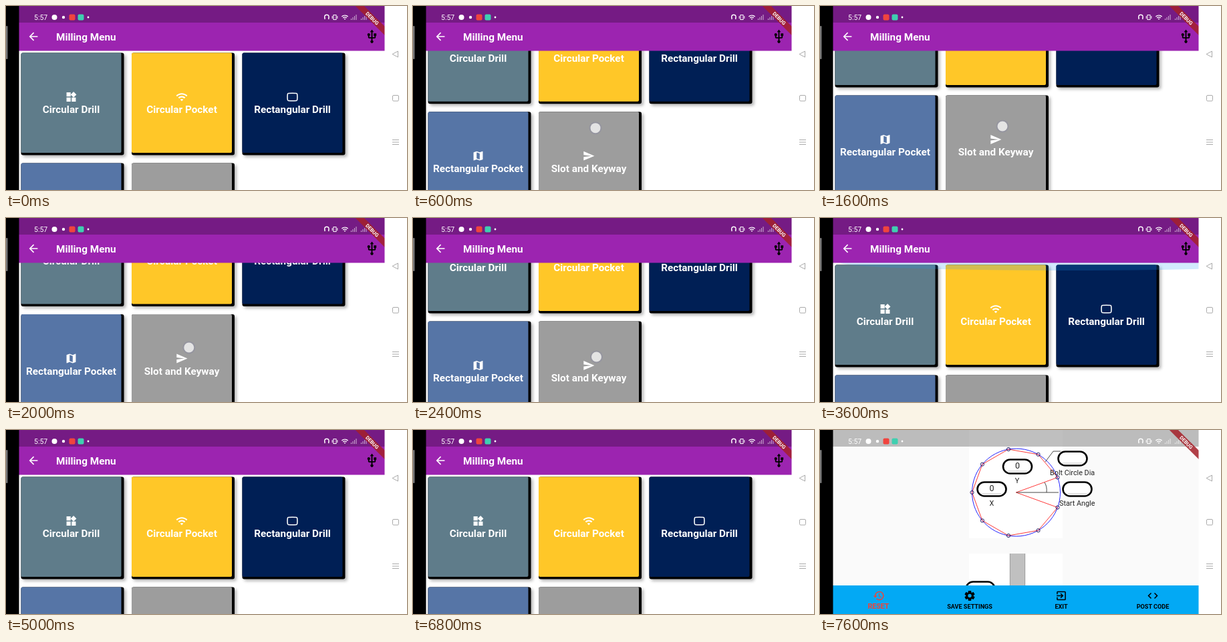
An HTML page that plays this animation: 600x277 px, repeating every 8 s.

```html
<!DOCTYPE html>
<html lang="en">
<head>
<meta charset="utf-8">
<title>Milling Menu</title>
<style>
html, body { margin: 0; width: 100%; height: 100%; overflow: hidden; background: #fff; }
svg { display: block; width: 100vw; height: 100vh; font-family: Roboto, "Open Sans", sans-serif; }
.mid { text-anchor: middle; }
.bold { font-weight: 700; }
.card { filter: drop-shadow(3px 3px 2px rgba(0, 0, 0, .28)); }
</style>
</head>
<body>
<svg id="stage" viewBox="0 0 600 277" preserveAspectRatio="none"></svg>
<script>
const LOOP = 8000, STEP = 200;

const PATHS = {
  back: 'M20 11H7.83l5.59-5.59L12 4l-8 8 8 8 1.41-1.41L7.83 13H20v-2z',
  usb: 'M15 7v4h1v2h-3V5h2l-3-4-3 4h2v8H8v-2.07c.7-.37 1.2-1.08 1.2-1.93a2.2 2.2 0 1 0-4.4 0c0 .85.5 1.56 1.2 1.93V13c0 1.11.89 2 2 2h3v3.05a2.2 2.2 0 1 0 2 0V15h3c1.11 0 2-.89 2-2v-2h1V7z',
  widgets: 'M13 13v8h8v-8zM3 21h8v-8H3zM3 3v8h8V3zm13.66-1.31L11 7.34 16.66 13l5.66-5.66z',
  wifi: 'M1 9l2 2c4.97-4.97 13.03-4.97 18 0l2-2C16.93 2.93 7.08 2.93 1 9zm8 8l3 3 3-3c-1.65-1.66-4.34-1.66-6 0zm-4-4l2 2c2.76-2.76 7.24-2.76 10 0l2-2C15.14 9.14 8.87 9.14 5 13z',
  screen: 'M4 5Q12 4 20 5Q21 5 21.4 7Q22 12 21.4 17Q21 19 20 19Q12 20 4 19Q3 19 2.6 17Q2 12 2.6 7Q3 5 4 5Z',
  map: 'M20.5 3l-.16.03L15 5.1 9 3 3.36 4.9c-.21.07-.36.25-.36.48V20.5c0 .28.22.5.5.5l.16-.03L9 18.9l6 2.1 5.64-1.9c.21-.07.36-.25.36-.48V3.5c0-.28-.22-.5-.5-.5zM15 19l-6-2.11V5l6 2.11z',
  send: 'M2.01 21L23 12 2.01 3 2 10l15 2-15 2z',
  history: 'M13 3a9 9 0 0 0-9 9H1l3.96 4.03L9 12H6a7 7 0 1 1 2.06 4.94l-1.42 1.42A9 9 0 1 0 13 3zm-1 5v5l4.28 2.54.72-1.21-3.5-2.08V8z',
  exit: 'M10.09 15.59L11.5 17l5-5-5-5-1.41 1.41L12.67 11H3v2h9.67zM19 3H5a2 2 0 0 0-2 2v4h2V5h14v14H5v-4H3v4a2 2 0 0 0 2 2h14a2 2 0 0 0 2-2V5a2 2 0 0 0-2-2z',
  code: 'M9.4 16.6L4.8 12l4.6-4.6L8 6l-6 6 6 6zm5.2 0l4.6-4.6-4.6-4.6L16 6l6 6-6 6z'
};

const rect = (x, y, w, h, fill, more = '') =>
  `<rect x="${x}" y="${y}" width="${w}" height="${h}" fill="${fill}" ${more}/>`;
const circle = (x, y, r, fill, more = '') =>
  `<circle cx="${x}" cy="${y}" r="${r}" fill="${fill}" ${more}/>`;
const line = (d, color, width = 1) =>
  `<path d="${d}" fill="none" stroke="${color}" stroke-width="${width}"/>`;
const text = (s, x, y, size, fill, cls = '') =>
  `<text x="${x}" y="${y}" font-size="${size}" fill="${fill}" class="${cls}">${s}</text>`;
// Icons sit on a 24-unit grid and are placed by their centre.
const icon = (name, x, y, scale, fill, more = '') =>
  `<path d="${PATHS[name]}" transform="translate(${x} ${y}) scale(${scale}) translate(-12 -12)" fill="${fill}" ${more}/>`;

function card(label, glyph, color, col, row) {
  const x = 22.5 + col * 165.5, y = 70.5 + row * 166;
  const cx = x + 75;
  const outline = glyph === 'screen';
  return `<g class="card">${rect(x, y, 154, 154, '#000', 'rx="3"')}</g>` +
    rect(x, y, 150, 150.5, color, 'rx="2"') +
    icon(glyph, cx, y + 66.5, .77, outline ? 'none' : '#fff', outline ? 'stroke="#fff" stroke-width="2"' : '') +
    text(label, cx, y + 90.5, 15.3, '#fff', 'mid bold');
}

function gear(x, y) {
  let teeth = '';
  for (let a = 0; a < 360; a += 60)
    teeth += rect(-2.2, -7.6, 4.4, 4, '#000', `rx=".6" transform="rotate(${a})"`);
  return `<g transform="translate(${x} ${y})">${teeth}${circle(0, 0, 4.2, 'none', 'stroke="#000" stroke-width="3"')}</g>`;
}

function pill(x, y, value = '') {
  return rect(x, y, 43, 21, '#fff', 'rx="10.5" stroke="#000" stroke-width="2.6"') +
    line(`M${x + 7} ${y + 17.5}h29`, '#aaa', .7) +
    text(value, x + 21.5, y + 13.5, 12.5, '#222', 'mid');
}

function boltCircle() {
  const cx = 293.5, cy = 94, r = 66;
  const holes = Array.from({ length: 9 }, (_, i) => {
    const a = (20 + 40 * i) * Math.PI / 180;
    return [cx + r * Math.cos(a), cy - r * Math.sin(a)].map(v => +v.toFixed(1));
  });
  return circle(cx, cy, r, 'none', 'stroke="#22f" stroke-width="1"') +
    line(`M${cx} ${cy}L${holes.join('L')}Z`, '#f22', .9) +
    holes.map(([x, y]) => circle(x, y, 2.6, 'none', 'stroke="#226" stroke-width="1"')).join('') +
    line(`M${cx} ${cy}H357M339 ${cy}Q340 85 336 79`, '#333', .9) +
    line('M337 48L349 32H360', '#333', .9);
}

const menu = [
  ['Circular Drill', 'widgets', '#5f7c8a', 0, 0],
  ['Circular Pocket', 'wifi', '#ffc728', 1, 0],
  ['Rectangular Drill', 'screen', '#001f55', 2, 0],
  ['Rectangular Pocket', 'map', '#5675a6', 0, 1],
  ['Slot and Keyway', 'send', '#9d9d9d', 1, 1]
].map(c => card(...c)).join('');

const appBar = rect(19, 0, 548, 67.5, '#9c24b0') +
  icon('back', 41, 46, .8, '#fff') +
  text('Milling Menu', 75, 52, 15.3, '#fff', 'bold') +
  icon('usb', 547.5, 46, .95, '#000');

const form = rect(19, 0, 548, 277, '#fafafa') +
  rect(223, 0, 140, 163, '#fff') + rect(223, 186, 140, 60, '#fff') +
  boltCircle() +
  pill(274, 44.5, '0') + pill(235.5, 78.5, '0') + pill(356.5, 32.5) + pill(363.5, 78.5) +
  text('Y', 295, 80, 10.8, '#222', 'mid') + text('X', 257, 114, 10.8, '#222', 'mid') +
  text('Bolt Circle Dia', 344, 68, 10.8, '#222') + text('Start Angle', 358, 114, 10.8, '#222') +
  rect(284, 186, 23, 50, '#c0c0c0') + line('M284.3 186v50M306.7 186v50', '#888', .7) +
  pill(218.5, 228.5) +
  rect(19, 234, 548, 43, '#03a9f4') +
  icon('history', 88, 249.5, .76, '#f44336') + gear(224, 249.5) +
  icon('exit', 361, 249.5, .76, '#000') + icon('code', 498, 249.5, .76, '#000') +
  text('RESET', 87.5, 268.5, 10.6, '#f44336', 'mid bold') +
  text('SAVE SETTINGS', 224, 268.5, 9.1, '#000', 'mid bold') +
  text('EXIT', 361, 268.5, 9.1, '#000', 'mid bold') +
  text('POST CODE', 498, 268.5, 9.1, '#000', 'mid bold');

const statusBar = rect(19, 0, 548, 25, '#000', 'fill-opacity=".25"') +
  text('5:57', 42, 20.5, 10.5, '#fff') +
  circle(72.5, 17, 4, '#fff') + circle(86, 17, 2.2, '#fff') +
  rect(94.5, 12.5, 9, 9, '#f0443e', 'rx="2"') + rect(107.5, 12.5, 9, 9, '#3fcfb0', 'rx="2"') +
  circle(123, 17, 1.4, '#fff') +
  line('M476.7 18v-1.5a3.2 3.2 0 0 1 6.4 0V18M477 17v3M482.8 17v3', '#fff', 1.4) +
  rect(490, 13.5, 4, 7, 'none', 'stroke="#fff"') + line('M488.2 15v4M495.8 15v4', '#fff') +
  icon('wifi', 507, 17, .46, '#fff') +
  [516, 531].map(x => line(`M${x + .5} 21v-2M${x + 3} 21v-4M${x + 5.5} 21v-6M${x + 8} 21v-8`, 'rgba(255,255,255,.6)', 1.1)).join('') +
  `<g transform="translate(566.5 0) rotate(45)">${rect(-40, 21.6, 80, 9.3, '#a5202a', 'fill-opacity=".85"')}
   ${text('DEBUG', 0, 29, 7.6, '#fff', 'mid bold')}</g>`;

const frame = rect(0, 0, 19.5, 277, '#000') + rect(0, 30, 2.5, 50, '#777', 'rx="1"') +
  rect(566.5, 0, 33.5, 277, '#fff') +
  line('M586.5 68v9l-8.5-4.5z', '#aaa') +
  rect(578.5, 134.5, 9, 8.5, 'none', 'rx="1.5" stroke="#aaa"') +
  line('M578 201.5h10M578 205h10M578 208.5h10', '#aaa');

const stage = document.getElementById('stage');
stage.innerHTML = rect(0, 0, 600, 277, '#fff') +
  `<g id="cards">${menu}</g>
   <ellipse id="glow" cx="370" cy="67" rx="340" ry="0" fill="#2196f3" fill-opacity=".2"/>
   ${appBar}<g id="form">${form}</g>${statusBar}
   <g id="touch">${circle(0, 0, 9.5, '#8f8fa0', 'fill-opacity=".6"')}${circle(0, 0, 7.5, '#e4e4e4')}</g>` + frame;
const [cards, glow, formPage, touch] = ['cards', 'glow', 'form', 'touch'].map(id => document.getElementById(id));

// Linear interpolation through [time, value] keys.
function track(keys, t) {
  const i = keys.findIndex(k => k[0] > t);
  if (i < 0) return keys[keys.length - 1][1];
  if (i === 0) return keys[0][1];
  const [t0, a] = keys[i - 1], [t1, b] = keys[i];
  return a + (b - a) * (t - t0) / (t1 - t0);
}

const scrollKeys = [[0, 0], [200, 8], [800, 112], [1000, 117], [1200, 114], [1600, 102], [2400, 81], [2800, 0]];
const glowKeys = [[2600, 0], [2800, 2], [3400, 12], [3600, 12], [4000, 2], [4200, 0]];
const touchKeys = [[200, 235], [800, 158], [1200, 168], [1600, 181], [2400, 209], [2600, 255]];

function draw(now) {
  const t = Math.floor(now % LOOP / STEP) * STEP;
  cards.setAttribute('transform', `translate(0 ${-track(scrollKeys, t)})`);
  glow.setAttribute('ry', track(glowKeys, t));

  const dragging = t >= 200 && t <= 2600;
  touch.setAttribute('visibility', dragging ? 'visible' : 'hidden');
  touch.setAttribute('transform', `translate(${track([[1600, 273], [2400, 274.5]], t)} ${track(touchKeys, t)})`);

  const shown = track([[6800, 0], [7000, .65], [7200, 1]], t);
  formPage.setAttribute('opacity', shown);
  formPage.setAttribute('transform', `translate(0 ${(1 - shown) * 40})`);
  requestAnimationFrame(draw);
}
draw(0);
</script>
</body>
</html>
```
